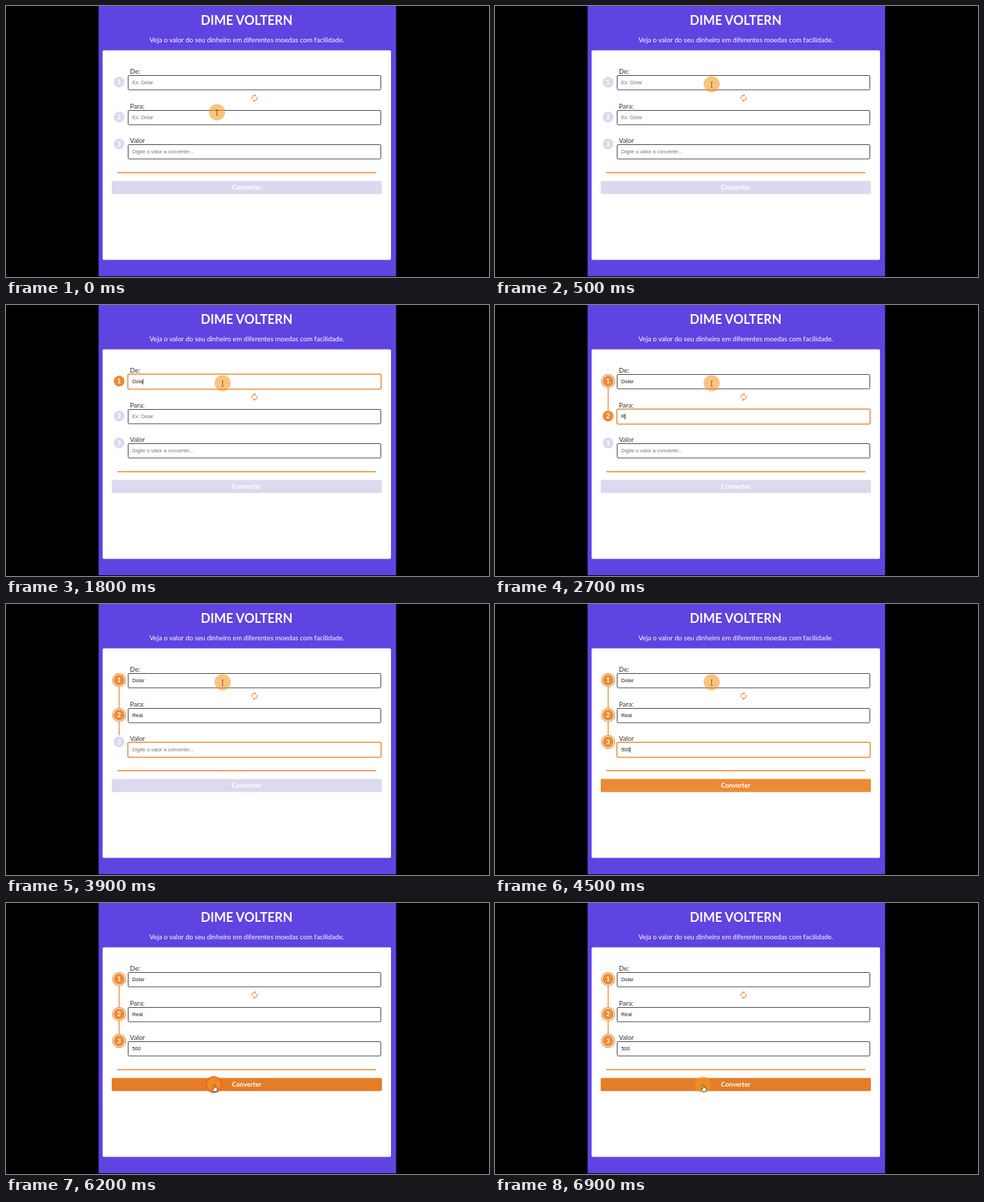
These frames come from a looping animation (690x388 px, 8 s). An HTML page:

```html
<!DOCTYPE html>
<html lang="pt">
<head>
<meta charset="utf-8">
<title>Conversor de moedas</title>
<style>
  html, body { margin: 0; width: 100%; height: 100%; overflow: hidden; background: #000; }
  svg { display: block; width: 100vw; height: 100vh; font-family: Lato, sans-serif; }
  .title { font-size: 18px; font-weight: 700; fill: #fff; }
  .subtitle { font-size: 9.66px; fill: #fff; }
  .label { font-size: 9.5px; fill: #333; }
  .value { font: 7.4px "Liberation Sans", Arial, sans-serif; }
  .bold { font-size: 9.4px; font-weight: 700; fill: #fff; }
  .mid { text-anchor: middle; }
  .field { fill: #fff; }
  .caret { stroke: #111; stroke-width: .8; }
  .accent { fill: #ec8b37; }
  .ring { fill: #fff; stroke: #ec8b37; stroke-width: 1.2; }
  .link { stroke: #ec8b37; stroke-width: 1.3; }
</style>
</head>
<body>
<svg id="stage" viewBox="0 0 690 388">
  <rect width="690" height="388"/>
  <rect x="132.3" width="425" height="387" fill="#5f44e1"/>
  <text class="title mid" x="343.8" y="26.6">DIME VOLTERN</text>
  <text class="subtitle mid" x="344" y="52.2">Veja o valor do seu dinheiro em diferentes moedas com facilidade.</text>
  <rect x="138" y="63.5" width="412" height="300" rx="1.8" fill="#fff"/>
  <g id="links"></g>
  <g id="rows"></g>
  <path class="accent" transform="translate(355 131.8) scale(.54) translate(-12 -12)"
    d="M12 6v3l4-4-4-4v3c-4.42 0-8 3.58-8 8 0 1.57.46 3.03 1.24 4.26L6.7 14.8c-.45-.83-.7-1.79-.7-2.8 0-3.31 2.69-6 6-6zm6.76 1.74L17.3 9.2c.44.84.7 1.79.7 2.8 0 3.31-2.69 6-6 6v-3l-4 4 4 4v-3c4.42 0 8-3.58 8-8 0-1.57-.46-3.03-1.24-4.26z"/>
  <rect class="accent" x="159" y="237.8" width="370" height="1.6"/>
  <rect id="button" x="151" y="250.4" width="386" height="18.8" rx="1.6"/>
  <text class="bold mid" x="343.8" y="263.2">Converter</text>
  <g id="pointer">
    <circle id="halo" r="11.5" fill="#f8981c" fill-opacity=".57"/>
    <circle id="ripple" fill="none" stroke="#ee671c" stroke-width="2"/>
    <path id="beam" d="M-1.4-3.4Q0-3.4 0-2.6Q0-3.4 1.4-3.4M0-2.6V3.6M-1.4 4.4Q0 4.4 0 3.6Q0 4.4 1.4 4.4"
      fill="none" stroke="#5b4a36" stroke-width=".8"/>
    <path id="arrow" d="M0 0V9L2.1 7.1L3.5 10.3L4.9 9.7L3.5 6.6H6.3Z" fill="#fff" stroke="#222" stroke-width=".7"/>
    <path id="hand" d="M-.2 .6Q.6-.5 1.3.6V4L3.7 4.5Q5 4.8 4.9 6L4.4 8.4L3.8 10H-.1L-2.5 6.7Q-2.5 5.5-1.4 5.8L-.2 6.8Z"
      fill="#fff" stroke="#333" stroke-width=".8" stroke-linejoin="round"/>
  </g>
</svg>
<script>
const DURATION = 8000;
const ORANGE = '#ec8b37', MUTED = '#dcd9ef';
const $ = id => document.getElementById(id);

// keys: time of each typed letter; caret: intervals in which it is visible
const fields = [
  { label: 'De:', hint: 'Ex: Dolar', text: 'Dolar', y: 99, dot: 109, keys: [1300, 1450, 1600, 1750, 1900],
    focus: [1000, 2200], caret: [[1000, 2200]], done: 1900 },
  { label: 'Para:', hint: 'Ex: Dolar', text: 'Real', y: 149, dot: 159, keys: [2700, 2850, 3000, 3200],
    focus: [2200, 3400], caret: [[2200, 3400]], done: 3200 },
  { label: 'Valor', hint: 'Digite o valor a converter...', text: '500', y: 198, dot: 197.5, keys: [4000, 4200, 4400],
    focus: [3400, 6200], caret: [[3400, 3900], [4000, 5000], [5500, 6000]], done: 4000 }
];
const links = [
  { from: 118, to: 151, start: 1900 },
  { from: 168, to: 188, start: 3200 }
];
const moves = [
  { start: 0, end: 500, from: [301.5, 152], to: [309.5, 112] },
  { start: 4900, end: 5600, from: [309.5, 112], to: [297, 260] }
];
const clicks = [
  { down: 900, up: 1200, end: 1600 },
  { down: 6200, up: 6500, end: 6900 }
];

const clamp = v => Math.min(1, Math.max(0, v));
const progress = (t, start, end) => clamp((t - start) / (end - start));
const smooth = v => v * v * (3 - 2 * v);
const within = (t, [start, end]) => t >= start && t < end;
const show = (el, on) => el.setAttribute('visibility', on ? 'visible' : 'hidden');

function set(el, attrs) {
  for (const name in attrs) el.setAttribute(name, attrs[name]);
}

function add(parent, tag, attrs, text = '') {
  const el = document.createElementNS('http://www.w3.org/2000/svg', tag);
  set(el, attrs);
  el.textContent = text;
  return parent.appendChild(el);
}

for (const link of links) {
  link.el = add($('links'), 'line', { class: 'link', x1: 161.6, x2: 161.6, y1: link.from });
}

fields.forEach((f, i) => {
  const rows = $('rows');
  add(rows, 'text', { class: 'label', x: 177, y: f.y - 1.8 }, f.label);
  f.box = add(rows, 'rect', { class: 'field' });
  f.value = add(rows, 'text', { class: 'value', x: 180.2, y: f.y + 13.2 });
  f.bar = add(rows, 'line', { class: 'caret', y1: f.y + 6.6, y2: f.y + 14.8 });
  f.ring = add(rows, 'circle', { class: 'ring', cx: 161.6, cy: f.dot, r: 9.3 });
  f.disc = add(rows, 'circle', { cx: 161.6, cy: f.dot, r: 7.7 });
  add(rows, 'text', { class: 'bold mid', x: 161.6, y: f.dot + 3.4 }, i + 1);
});

function drawField(f, t) {
  const focused = within(t, f.focus);
  const grow = focused ? .4 : 0;
  const typed = f.text.slice(0, f.keys.filter(k => t >= k).length);
  set(f.box, {
    x: 174.5 - grow, y: f.y + .5 - grow, width: 361 + 2 * grow, height: 20.5 + 2 * grow,
    rx: focused ? 2 : 1.4, stroke: focused ? ORANGE : '#49474f', 'stroke-width': focused ? 1.5 : 1
  });
  f.value.textContent = typed || f.hint;
  f.value.setAttribute('fill', typed ? '#1c1c1c' : '#757575');
  const x = 180.6 + (typed ? f.value.getComputedTextLength() : 0);
  set(f.bar, { x1: x, x2: x });
  show(f.bar, f.caret.some(span => within(t, span)));
  show(f.ring, t >= f.done);
  f.disc.setAttribute('fill', typed ? ORANGE : MUTED);
}

function drawPointer(t) {
  const move = t < moves[1].start ? moves[0] : moves[1];
  const p = smooth(progress(t, move.start, move.end));
  const [x, y] = move.from.map((v, i) => v + (move.to[i] - v) * p);
  $('pointer').setAttribute('transform', `translate(${x} ${y})`);

  const overField = fields.some(f => y > f.y && y < f.y + 21.5);
  const overButton = y > 250;
  show($('beam'), overField);
  show($('hand'), overButton);
  show($('arrow'), !overField && !overButton);

  const click = clicks.find(c => within(t, [c.down, c.end]));
  show($('ripple'), click);
  if (click) {
    const spread = progress(t, click.up, click.end);
    set($('ripple'), { r: 11 + 8 * spread, opacity: 1 - spread });
  }
}

function render(t) {
  fields.forEach(f => drawField(f, t));
  for (const { el, from, to, start } of links) {
    const p = progress(t, start, start + 500);
    el.setAttribute('y2', from + (to - from) * p);
    show(el, p > 0);
  }
  $('button').setAttribute('fill', t < 4000 ? MUTED : t < 6200 ? ORANGE : '#e57d26');
  drawPointer(t);
}

const began = performance.now();
function tick() {
  render((performance.now() - began) % DURATION);
  requestAnimationFrame(tick);
}
tick();
</script>
</body>
</html>
```
